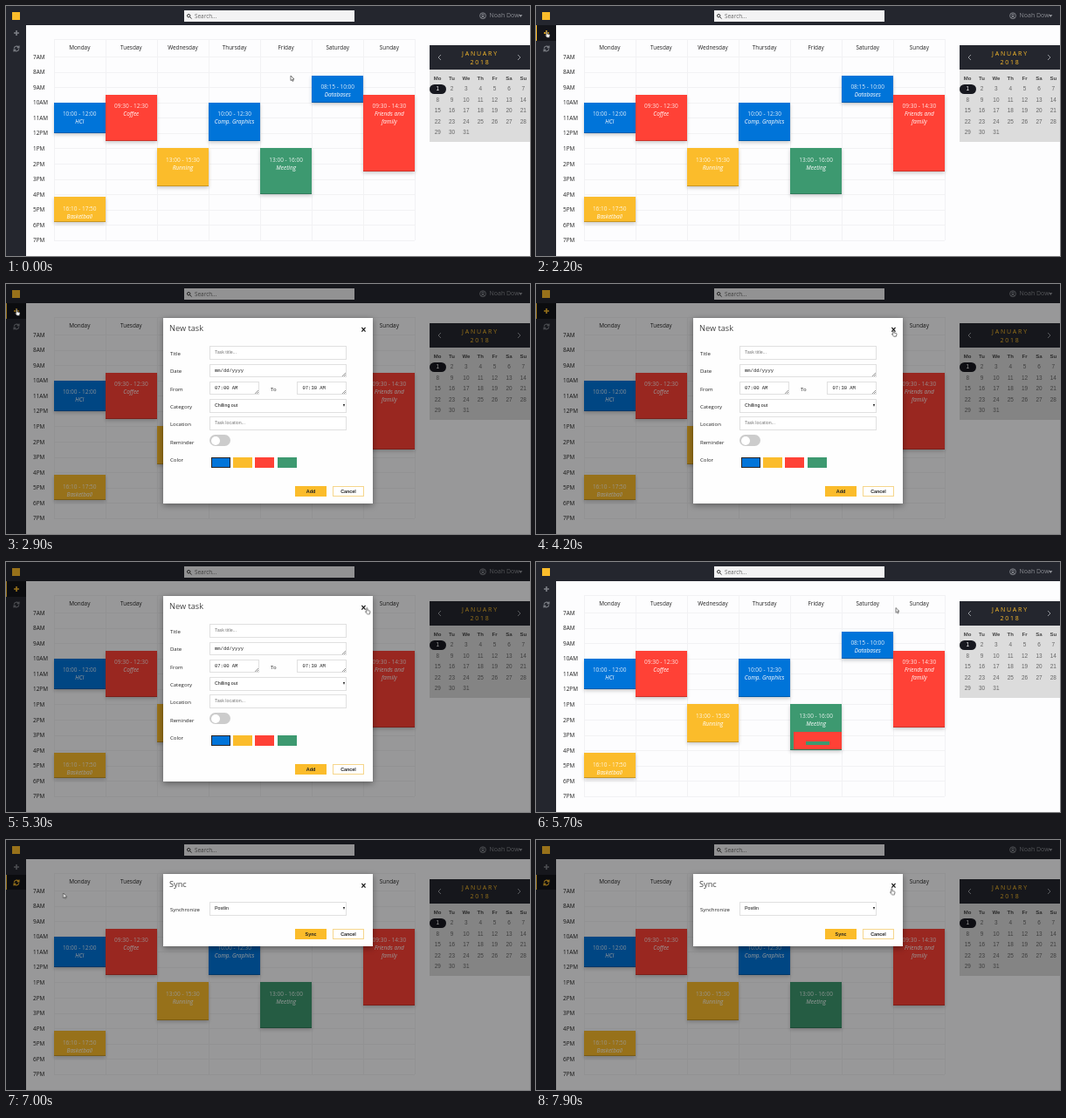
An HTML page that plays this animation: 600 by 287 pixels, repeating every 8 s.

```html
<!DOCTYPE html>
<html lang="en">
<head>
<meta charset="utf-8">
<title>Weekly planner</title>
<style>
  :root { --ink: #24262e; --gold: #fbbc2b; --blue: #0074d9; --red: #ff4136; --green: #3d9970; }
  html, body { margin: 0; width: 100%; height: 100%; overflow: hidden; }
  #stage {
    position: relative; width: 600px; height: 287px; overflow: hidden;
    background: #fdfdfe; color: #222; font: 6.4px/10px "Open Sans", "Noto Sans", sans-serif;
  }
  #stage div, #stage svg { position: absolute; box-sizing: border-box; white-space: nowrap; }
  #stage svg { overflow: visible; }
  .anim { animation: 8s step-end -20ms infinite; }
  .mid { text-align: center; }
  .dark { background: var(--ink); }
  .line { background: #f2f2f4; }

  .search { background: #f3f3f4; color: #666; line-height: 13px; padding-left: 12px; }
  .user { color: #8b8d93; font-size: 7px; }
  .item { color: #7d8087; border-left: 1.5px solid transparent; }
  #stage .item svg { left: 6.5px; top: 5px; }
  #plus { animation-name: plus; }
  #sync { animation-name: sync; }

  .event {
    padding-top: 8.5px; text-align: center; font-size: 6.5px; line-height: 9px; color: #fffd;
    border-bottom: 1px solid #0003; box-shadow: 0 2px 4px #0003;
  }
  #stage .event i { display: block; white-space: normal; padding: 0 12px; color: #fff; }
  #stage .event i.wide { padding: 0; }
  .month { color: var(--gold); font-size: 7px; letter-spacing: 1.8px; text-align: center; }
  .cal { font-family: "Liberation Sans", Arial, sans-serif; color: #666; text-align: center; }
  .cal.head { font-weight: bold; font-size: 6px; color: #444; }
  .today { background: #17181f; border-radius: 6px; }

  #shade { inset: 0; background: #0006; z-index: 1; animation-name: shade; }
  #ghost { z-index: 2; background: var(--red); animation-name: ghost; }
  .modal { background: #fefefe; box-shadow: 0 2px 7px #0006; z-index: 3; }
  #taskBox { animation-name: taskBox; }
  #syncBox { animation-name: syncBox; }
  .title { font-size: 9.2px; color: #444; }
  .label { font-size: 6px; }
  .close { font: bold 10px/10px "Liberation Sans", sans-serif; color: #111; }
  .field {
    border: 1px solid #e0e0e0; padding-left: 5.5px; background: #fff; color: #777;
    font: 5.3px/13px "Liberation Sans", Arial, sans-serif;
  }
  .field.pick { color: #111; }
  .field.pick::after {
    content: ""; position: absolute; right: 1.5px; top: 5px;
    border: 1.8px solid transparent; border-top: 3px solid #111; border-bottom: 0;
  }
  .field.area { font: 5.5px/13px "Liberation Mono", monospace; color: #222; }
  .field.area::after {
    content: ""; position: absolute; right: 0; bottom: 0; width: 4px; height: 4px;
    background: linear-gradient(135deg, #0000 50%, #999 50% 60%, #0000 60% 75%, #999 75% 85%, #0000 85%);
  }
  .button {
    font: bold 5.4px/10px "Liberation Sans", Arial, sans-serif; text-align: center; color: #222;
    border: 1px solid #f6d68c; background: #fff;
  }
  .button.main { background: var(--gold); border-color: var(--gold); }
  .toggle { background: #ccc; border-radius: 7px; }
  .knob { background: #fff; border-radius: 50%; }

  #cursor { left: 0; top: 0; z-index: 4; animation-name: move; }
  #arrow { animation-name: arrow; }
  #hand { animation-name: hand; }

  @keyframes shade { 0% { opacity: 0 } 28.75% { opacity: 1 } 71.25% { opacity: 0 } 83.75%, 100% { opacity: 1 } }
  @keyframes ghost { 0% { opacity: 0 } 71.25% { opacity: 1 } 72.5%, 100% { opacity: 0 } }
  @keyframes plus {
    0% { color: #7d8087; border-color: transparent; background: none }
    17.5% { color: var(--gold); border-color: var(--gold); background: #131419 }
    71.25%, 100% { color: #7d8087; border-color: transparent; background: none }
  }
  @keyframes sync {
    0% { color: #7d8087; border-color: transparent; background: none }
    80%, 100% { color: var(--gold); border-color: var(--gold); background: #131419 }
  }
  @keyframes taskBox {
    0% { opacity: 0; transform: none }
    28.75% { opacity: .39; transform: translateY(-81px) }
    30% { opacity: .79; transform: translateY(-28px) }
    31.25% { opacity: .95; transform: translateY(-6px) }
    32.5% { opacity: 1; transform: none }
    71.25%, 100% { opacity: 0; transform: none }
  }
  @keyframes syncBox {
    0% { opacity: 0; transform: none }
    83.75% { opacity: .39; transform: translateY(-81px) }
    85% { opacity: .79; transform: translateY(-28px) }
    86.25% { opacity: .95; transform: translateY(-6px) }
    87.5%, 100% { opacity: 1; transform: none }
  }
  @keyframes move {
    0% { transform: translate(326px, 80px); animation-timing-function: steps(7) }
    8.75% { transform: translate(290px, 120px) }
    11.25% { transform: translate(290px, 120px); animation-timing-function: steps(5) }
    17.5% { transform: translate(11px, 29px) }
    36.25% { transform: translate(11px, 29px); animation-timing-function: steps(9) }
    47.5% { transform: translate(396px, 66px) }
    50% { transform: translate(396px, 66px); animation-timing-function: steps(2) }
    52.5% { transform: translate(408px, 53px) }
    58.75% { transform: translate(408px, 53px); animation-timing-function: steps(6) }
    66.25% { transform: translate(412px, 52.5px) }
    71.25% { transform: translate(412px, 52.5px); animation-timing-function: steps(7) }
    80% { transform: translate(7px, 50px) }
    86.25% { transform: translate(7px, 50px); animation-timing-function: steps(5) }
    92.5% { transform: translate(300px, 105px); animation-timing-function: steps(5) }
    98.75%, 100% { transform: translate(406px, 55.5px) }
  }
  @keyframes hand {
    0% { opacity: 0 } 17.5% { opacity: 1 } 37.5% { opacity: 0 } 52.5% { opacity: 1 }
    71.25% { opacity: 0 } 80% { opacity: 1 } 87.5% { opacity: 0 } 98.75%, 100% { opacity: 1 }
  }
  @keyframes arrow {
    0% { opacity: 1 } 17.5% { opacity: 0 } 37.5% { opacity: 1 } 52.5% { opacity: 0 }
    71.25% { opacity: 1 } 80% { opacity: 0 } 87.5% { opacity: 1 } 98.75%, 100% { opacity: 0 }
  }
</style>
</head>
<body>
<div id="stage">
  <div class="dark" style="left:0;top:0;width:600px;height:22px"></div>
  <div class="dark" style="left:0;top:22px;width:23px;height:265px"></div>
  <div style="left:7px;top:7px;width:9px;height:9px;background:var(--gold)"></div>
  <div class="search" style="left:204px;top:4.5px;width:195px;height:13.5px">Search...
    <svg style="left:3px;top:4px" width="6" height="6" fill="none" stroke="#333">
      <circle cx="2.2" cy="2.2" r="1.7"/><path d="M3.5 3.5L5.5 5.5"/>
    </svg>
  </div>
  <svg style="left:542px;top:7px" width="8" height="8" fill="none" stroke="#8b8d93" stroke-width=".9">
    <circle cx="4" cy="4.2" r="3.4"/><circle cx="4" cy="3.4" r="1.2"/><path d="M1.7 6.5Q4 4 6.3 6.5"/>
  </svg>
  <div class="user" style="left:553.5px;top:6px">Noah Dow</div>
  <svg style="left:587px;top:10px" width="4" height="3" fill="#8b8d93"><path d="M0 0H4.4L2.2 3Z"/></svg>

  <div id="plus" class="item anim" style="left:0;top:22px;width:23px;height:17.5px">
    <svg width="8" height="8" fill="none" stroke="currentColor" stroke-width="1.6"><path d="M4 1V7M1 4H7"/></svg>
  </div>
  <div id="sync" class="item anim" style="left:0;top:39.5px;width:23px;height:17.5px">
    <svg width="8" height="8" fill="none" stroke="currentColor" stroke-width="1.1">
      <path d="M1.2 3.6A2.9 2.9 0 0 1 6.3 2.2M6.8 4.4A2.9 2.9 0 0 1 1.7 5.8M7 .6V2.9H4.7M1 7.4V5.1H3.3"/>
    </svg>
  </div>

  <div id="shade" class="anim"></div>
  <div id="ghost" class="anim" style="left:295px;top:195px;width:55px;height:20px">
    <div style="left:14px;top:10.5px;width:27px;height:4px;background:var(--green)"></div>
  </div>
  <div id="taskBox" class="modal anim" style="left:180px;top:39px;width:240px;height:213px"></div>
  <div id="syncBox" class="modal anim" style="left:180px;top:39px;width:240px;height:83px"></div>

  <svg id="cursor" class="anim" width="8" height="9" stroke="#222" stroke-width=".6" fill="#fff">
    <path id="arrow" class="anim" d="M0 0V5.6L1.3 4.5L2.2 6.4L3.1 6L2.3 4.1H4Z"/>
    <path id="hand" class="anim" d="M.8 .6Q1.5-.2 2 .6V3L4.4 3.5Q5.2 3.8 5 4.8L4.4 7.2H1.6L-.6 4.6Q-.5 3.8 .8 4.6Z"/>
  </svg>
</div>
<script>
  const stage = document.getElementById('stage');
  const taskBox = document.getElementById('taskBox');
  const syncBox = document.getElementById('syncBox');

  function add(parent, cls, x, y, w, h, html = '') {
    const el = document.createElement('div');
    el.className = cls;
    el.innerHTML = html;
    const px = { left: x, top: y, width: w, height: h };
    for (const key in px) if (px[key] != null) el.style[key] = px[key] + 'px';
    parent.append(el);
    return el;
  }
  const text = (parent, cls, x, midY, html) => add(parent, cls, x, midY - 5, null, 10, html);
  const centered = (parent, cls, midX, midY, html) =>
    add(parent, cls + ' mid', midX - 30, midY - 5, 60, 10, html);

  // Week grid
  const left = 54.7, colW = 59.1, top7 = 58, rowH = 17.58;
  const hourY = h => top7 + (h - 7) * rowH;
  const days = ['Monday', 'Tuesday', 'Wednesday', 'Thursday', 'Friday', 'Saturday', 'Sunday'];
  add(stage, 'line', left, 38, colW * 7, 1);
  for (let h = 7; h <= 19; h++) {
    add(stage, 'line', left, Math.round(hourY(h)), colW * 7, 1);
    text(stage, '', 31, hourY(h) + .5, (h > 12 ? h - 12 : h) + (h < 12 ? 'AM' : 'PM'));
  }
  for (let d = 0; d <= 7; d++) add(stage, 'line', Math.round(left + d * colW), 38, 1, 231);
  days.forEach((name, d) => centered(stage, '', left + (d + .5) * colW, 48.3, name));

  const clock = h => {
    const m = Math.round(h * 60);
    return [Math.floor(m / 60), m % 60].map(n => String(n).padStart(2, '0')).join(':');
  };
  const events = [
    [0, 10, 12, 'blue', 'HCI'], [0, 16 + 1 / 6, 17 + 5 / 6, 'gold', 'Basketball'],
    [1, 9.5, 12.5, 'red', 'Coffee'], [2, 13, 15.5, 'gold', 'Running'],
    [3, 10, 12.5, 'blue', 'Comp. Graphics'], [4, 13, 16, 'green', 'Meeting'],
    [5, 8.25, 10, 'blue', 'Databases'], [6, 9.5, 14.5, 'red', 'Friends and family']
  ];
  for (const [day, from, to, color, name] of events) {
    const y = hourY(from);
    const wide = name.startsWith('Comp') ? ' class="wide"' : '';
    add(stage, 'event', left + day * colW, y, colW, hourY(to) - y,
      `${clock(from)} - ${clock(to)}<i${wide}>${name}</i>`).style.background = `var(--${color})`;
  }

  // Month calendar
  add(stage, 'dark', 485, 45, 115, 27.5);
  add(stage, '', 485, 72.5, 115, 83.5).style.background = '#dcdcdc';
  add(stage, 'month', 503, 49.8, 80, 10, 'JANUARY');
  add(stage, 'month', 503, 60, 80, 10, '2018');
  for (const [x, d] of [[494, 'M4 0L1 3L4 6'], [585, 'M1 0L4 3L1 6']]) {
    add(stage, '', x, 56, 5, 6,
      `<svg width="5" height="6" fill="none" stroke="#a0a2a8" stroke-width=".9"><path d="${d}"/></svg>`);
  }
  const calX = i => 494.2 + (i % 7) * 16.35;
  days.forEach((name, i) => centered(stage, 'cal head', calX(i), 82.5, name.slice(0, 2)));
  add(stage, 'today', 485, 89.5, 19, 11.5);
  for (let n = 1; n <= 31; n++) {
    const cell = centered(stage, 'cal', calX(n - 1), 95.3 + Math.floor((n - 1) / 7) * 12.5, n);
    if (n === 1) cell.style.color = '#fff';
  }

  // Dialogs, in their own coordinates
  function frame(box, title, action, height) {
    text(box, 'title', 7, 12, title);
    centered(box, 'close', 229.5, 13.5, '×');
    add(box, 'button main', 151, height - 20, 36, 12, action);
    add(box, 'button', 194, height - 20, 36, 12, 'Cancel');
  }
  const label = (box, y, name, x = 8) => text(box, 'label', x, y, name);
  const field = (box, kind, x, y, w, value) => add(box, 'field ' + kind, x, y, w, 15.5, value);

  frame(taskBox, 'New task', 'Add', 213);
  ['Title', 'Date', 'From', 'Category', 'Location', 'Reminder', 'Color']
    .forEach((name, i) => label(taskBox, 40.7 + i * 20.4, name));
  label(taskBox, 81.5, 'To', 123);
  field(taskBox, '', 52.5, 32, 157.5, 'Task title...');
  field(taskBox, 'area', 52.5, 52.5, 157.5, 'mm/dd/yyyy');
  field(taskBox, 'area', 52.5, 72.5, 57, '07:00 AM');
  field(taskBox, 'area', 153, 72.5, 57, '07:30 AM');
  field(taskBox, 'pick', 52.5, 93, 157.5, 'Chilling out');
  field(taskBox, '', 52.5, 113, 157.5, 'Task location...');
  add(taskBox, 'toggle', 53, 134, 23.5, 13);
  add(taskBox, 'knob', 54.5, 135.5, 10, 10);
  ['blue', 'gold', 'red', 'green'].forEach((color, i) => {
    const swatch = add(taskBox, '', 55 + i * 25.2, 159.5, 22, 12);
    swatch.style.background = `var(--${color})`;
    if (!i) swatch.style.border = '1px solid #222';
  });

  frame(syncBox, 'Sync', 'Sync', 83);
  label(syncBox, 40.7, 'Synchronize');
  field(syncBox, 'pick', 52.5, 32, 157.5, 'Postlin');
</script>
</body>
</html>
```
